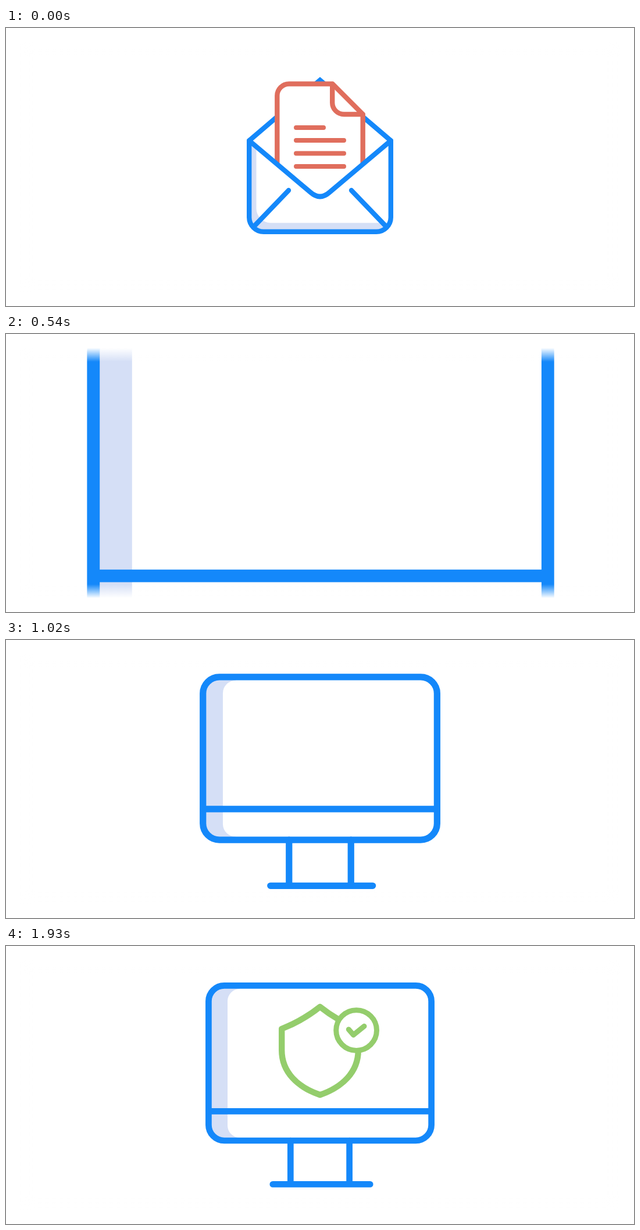
An HTML page that plays this animation: 1080 by 480 pixels, repeating every 2.33 s.

```html
<!DOCTYPE html>
<html lang="en">
<head>
<meta charset="utf-8">
<title>Letter to protected computer</title>
<style>
  html, body { margin: 0; width: 100%; height: 100%; overflow: hidden; background: #fff; }
  svg { display: block; width: 100%; height: 100%; }
  g { fill: none; stroke-linecap: round; stroke-linejoin: round; }
  .blue { stroke: #1488fa; }
  .red { stroke: #e06e5d; }
  .green { stroke: #94cd6c; }
  .shade { fill: #d5dff6; stroke: none; }
  .white { fill: #fff; }
  /* soft white edges of the stage */
  body::after {
    content: ""; position: fixed; inset: 0;
    background:
      linear-gradient(#fff 24px, #fff0 48px, #fff0 432px, #fff 456px),
      linear-gradient(90deg, #fff 24px, #fff0 48px, #fff0 1032px, #fff 1056px);
  }
</style>
</head>
<body>
<svg viewBox="0 0 1080 480">
  <g id="envelope" stroke-width="8.4">
    <path class="blue white" stroke-linejoin="miter" d="M418.2 194.5 540 90 661.8 194.5"/>
    <g class="red">
      <path class="white" d="M466.3 270V117A20.5 20.5 0 0 1 486.8 96.5H561.5L613.7 149V270"/>
      <path d="M561.2 97V129A20 20 0 0 0 581.2 149H613.5"/>
      <path stroke-width="8" d="M499 172H546M499 194H581M499 216.4H581M499 239H581"/>
    </g>
    <path class="white" d="M418.2 194.5 524 284Q540 298 556 284L661.8 194.5V327A25 25 0 0 1 637 351.8H443A25 25 0 0 1 418.2 327Z"/>
    <path class="shade" d="M418.2 194.5 430.5 204V312A25 25 0 0 0 455 336.5H660A25 25 0 0 1 637 351.8H443A25 25 0 0 1 418.2 327Z"/>
    <path class="blue" d="M418.2 194.5 524 284Q540 298 556 284L661.8 194.5V327A25 25 0 0 1 637 351.8H443A25 25 0 0 1 418.2 327Z"/>
    <path class="blue" d="M486 280.3 427 342M594 280.3 653 342"/>
  </g>
  <g id="monitor" stroke-width="10.7">
    <path class="shade" d="M402 69H375A27 27 0 0 0 348 96V309A27 27 0 0 0 375 336H402V331A21 21 0 0 1 381 310V95A21 21 0 0 1 402 74Z"/>
    <g class="blue">
      <rect x="348.4" y="68.4" width="383.2" height="267.6" rx="27"/>
      <path d="M349 285.3H731M489.3 336V411M590.6 336V411M458.8 411.4H626.2"/>
    </g>
    <g id="shield" class="green">
      <path stroke-width="10.4" d="M540 105Q510 129 474.2 143V180C474.2 218 502 244 540 257C578 244 605.8 218 605.8 180V143Q570 129 540 105Z"/>
      <circle class="white" stroke-width="9" cx="602.6" cy="145.6" r="34.9"/>
      <path stroke-width="9" d="M589.3 144 597.5 153.5 616 138.5"/>
    </g>
  </g>
</svg>
<script>
const LOOP = 2330, STEP = 60;
const START_VIEW = 0.307; // camera width at the start, 1 at the end
const [envelope, monitor, shield] =
  ["envelope", "monitor", "shield"].map(id => document.getElementById(id));

const clamp = x => Math.min(1, Math.max(0, x));
const ease = x => (1 - Math.cos(Math.PI * x ** 1.117)) / 2;
const steps = ms => Math.floor(ms / STEP);

// scale around (x, y), then shift vertically
const place = (el, scale, x, y, dy = 0) =>
  el.setAttribute("transform", `translate(${x} ${y + dy}) scale(${scale}) translate(${-x} ${-y})`);

function draw() {
  const t = performance.now() % LOOP;
  const pan = ease(clamp((steps(t) * STEP - 140) / 1040));
  const view = START_VIEW + (1 - START_VIEW) * pan;
  place(envelope, START_VIEW / view, 540, 240, -870 * pan / view);
  place(monitor, 1 / view, 539, 158);
  envelope.style.display = pan < 0.5 ? "" : "none";
  shield.style.opacity = clamp((steps(t - 1390) + 1) / 10);
  requestAnimationFrame(draw);
}
draw();
</script>
</body>
</html>
```
